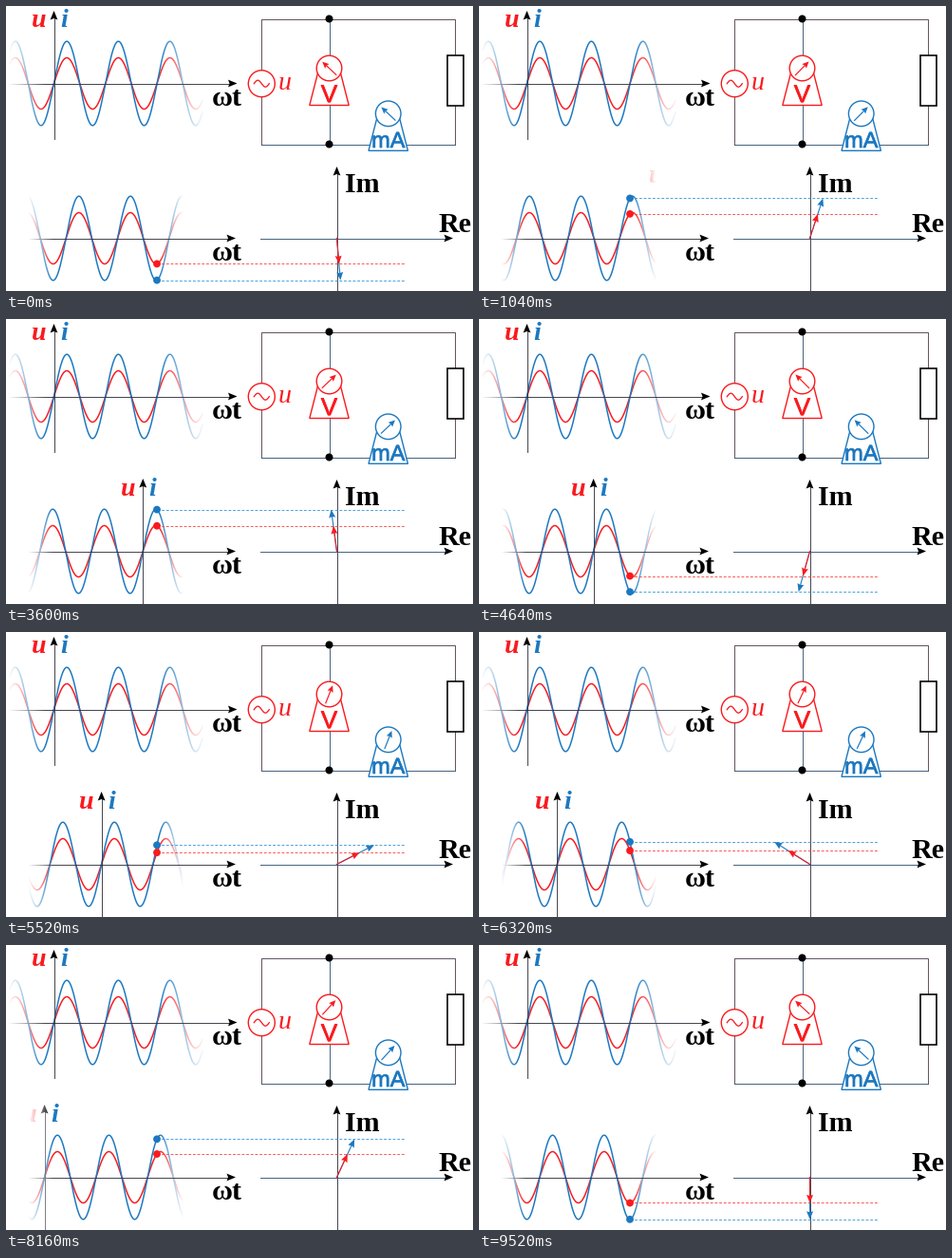
Recreate the animation shown at these times as a matplotlib script. Size 492 by 300 pixels, loop 9.6 s.

```python
import numpy as np
import matplotlib.pyplot as plt
from matplotlib.animation import FuncAnimation
from matplotlib.patches import Circle, Polygon, Rectangle
from matplotlib.patheffects import withStroke

W, H, DPI = 492, 300, 100
PX = 72 / DPI
RED, BLUE, DARK = "#fa1a1e", "#1c78c0", "#33333d"
PALE_RED, PALE_BLUE = "#fb4a4a", "#3c9bdc"
PLUM, STEEL = "#54414e", "#335272"

FRAMES, INTERVAL = 120, 80
PERIOD = 54.3              # wavelength in px
AMP_U, AMP_I = 27, 44.3
START, STEP = -445, 12.06  # phase in degrees
SAMPLE_X = 159
LEFT_X = 50.5              # vertical axis of the upper plot
MID_TOP, MID_LOW = 81.5, 244.5
ORIGIN = np.array([348.5, MID_LOW])

fig = plt.figure(figsize=(W / DPI, H / DPI), dpi=DPI, facecolor="white")
ax = fig.add_axes([0, 0, 1, 1])
ax.axis("off")


def line(x, y, color=DARK, width=0.9, z=2, **kw):
    return ax.plot(x, y, color=color, lw=width * PX, zorder=z, **kw)[0]


def label(x, y, text, color="black", size=30, family="Liberation Serif",
          weight="bold", style="normal", ha="left", z=5):
    return ax.text(x, y, text, color=color, fontsize=size * PX, family=family,
                   weight=weight, style=style, ha=ha, va="baseline", zorder=z)


def name(x, y, text, color, weight="bold", z=5):
    return label(x, y, text, color, 28, weight=weight, style="italic", z=z)


def head_points(tip, angle, length=9.5, half=3.9, notch=1.5):
    """Arrowhead outline; the angle is counted upwards from the right."""
    a = np.radians(angle)
    along = np.array([np.cos(a), -np.sin(a)])
    side = np.array([np.sin(a), np.cos(a)])
    tip = np.asarray(tip, float)
    back = tip - length * along
    return np.array([tip, back + half * side, back + notch * along,
                     back - half * side])


def head(tip, angle, color="black", z=3, **kw):
    shape = Polygon(head_points(tip, angle, **kw), fc=color, ec="none", zorder=z)
    ax.add_patch(shape)
    return shape


def disc(x, y, r, face, edge="none", width=0.0, z=3):
    shape = Circle((x, y), r, fc=face, ec=edge, lw=width * PX, zorder=z)
    ax.add_patch(shape)
    return shape


def wave(x, origin, amp, mid):
    return mid - amp * np.sin(2 * np.pi * (x - origin) / PERIOD)


def fade(x0, x1, stops, opacity, top, bottom, z):
    """White veil from x0 to x1 whose opacity is interpolated over stops."""
    x = np.arange(x0, x1, 0.5) + 0.25
    veil = np.ones((1, len(x), 4))
    veil[0, :, 3] = np.interp(x, stops, opacity)
    ax.imshow(veil, extent=(x0, x1, bottom, top), aspect="auto",
              interpolation="nearest", zorder=z)


def time_axis(start, tip, y):
    line([start, tip - 7], [y, y], z=4.2)
    head((tip, y), 0, z=4.2)


class Arrow:
    def __init__(self, color, width, z, **shape):
        self.shape = shape
        self.stem = line([], [], color, width, z)
        self.head = head((0, 0), 0, color, z + 0.1, **shape)

    def put(self, tail, tip, angle):
        points = head_points(tip, angle, **self.shape)
        end = points[2]
        self.stem.set_data([tail[0], end[0]], [tail[1], end[1]])
        self.head.set_xy(points)


class Meter:
    def __init__(self, x, y, text, color, size):
        self.center = np.array([x, y])
        ax.add_patch(Polygon([(x - 12, y + 5), (x - 20.7, y + 39),
                              (x + 20.7, y + 39), (x + 12, y + 5)],
                             fc="white", ec=color, lw=1.4 * PX, zorder=5))
        disc(x, y, 13.3, "white", color, 1.4, z=6)
        sign = label(x, y + 35.7, text, color, size, "Liberation Sans",
                     "normal", ha="center", z=7)
        sign.set_path_effects([withStroke(linewidth=0.5, foreground=color)])
        self.needle = Arrow(color, 1.2, 7, length=7, half=3.2, notch=1)

    def put(self, value):
        angle = 90 - 47 * value
        a = np.radians(angle)
        reach = 10 * np.array([np.cos(a), -np.sin(a)])
        self.needle.put(self.center - reach, self.center + reach, angle)


# Upper plot
xs_top = np.linspace(4, 207, 600)
line(xs_top, wave(xs_top, LEFT_X, AMP_U, MID_TOP), RED, 1.5)
line(xs_top, wave(xs_top, LEFT_X, AMP_I, MID_TOP), BLUE, 1.5)
fade(100, 215, [160, 210], [0, 1], 30, 135, 4)
fade(0, 60, [3, 42], [1, 0], 30, 135, 4.5)
line([LEFT_X, LEFT_X], [12, 140], z=5)
head((LEFT_X, 5), 90, z=5)
time_axis(3, 243.5, MID_TOP)
name(27, 21.8, "u", RED)
name(57, 21.8, "i", BLUE)
label(216.5, 105, "ωt")

# Circuit
line([269.4, 269.4, 472.6, 472.6], [145.5, 13.5, 13.5, 145.5], PLUM)
line([269.4, 472.6], [145.5, 145.5], STEEL)
line([340.5, 340.5], [13.5, 145.5], STEEL)
disc(340.5, 13.5, 4, "black")
disc(340.5, 145.5, 4, "black")
ax.add_patch(Rectangle((464.5, 52), 17, 53, fc="white", ec="black",
                       lw=1.6 * PX, zorder=3))
disc(269.3, 81.7, 14, "white", RED, 1.4)
xs = np.linspace(-8, 8, 40)
line(269.3 + xs, 81.7 - 3.5 * np.sin(np.pi * (xs + 8) / 8), RED, 1.3, 4)
name(287, 88, "u", RED, weight="normal")
volts = Meter(340.5, 65.5, "V", RED, 26)
amps = Meter(402.7, 113.3, "mA", BLUE, 23.5)

# Lower plot
xs_low = np.linspace(24, 187, 500)
wave_u = line(xs_low, 0 * xs_low, RED, 1.5)
wave_i = line(xs_low, 0 * xs_low, BLUE, 1.5)
axis = line([0, 0], [174, 300], z=3)
axis_head = head((0, 0), 90)
name_u = name(0, 186.2, "u", RED, z=3)
name_i = name(0, 186.2, "i", BLUE, z=3)
fade(100, 262, [161, 187], [0, 1], 160, 300, 4)
fade(0, 60, [24, 50], [1, 0], 160, 300, 4.5)
time_axis(24, 242, MID_LOW)
label(216.5, 268.5, "ωt")
dot_u = disc(SAMPLE_X, 0, 3.9, RED, z=7)
dot_i = disc(SAMPLE_X, 0, 3.9, BLUE, z=7)

# Phasor plane
line([ORIGIN[0]] * 2, [176, 300])
head((ORIGIN[0], 169), 90)
line([268, 464], [MID_LOW] * 2, STEEL)
head((471, MID_LOW), 0)
label(357, 195.5, "Im")
label(455.3, 238, "Re")
dash = dict(dashes=(3.2, 2), dash_capstyle="butt")
level_u = line([SAMPLE_X, 420], [0, 0], PALE_RED, 0.9, 4.8, **dash)
level_i = line([SAMPLE_X, 420], [0, 0], PALE_BLUE, 0.9, 4.8, **dash)
phasor_i = Arrow(BLUE, 1.1, 7, length=8.5, half=3.5, notch=1)
phasor_u = Arrow(RED, 1.1, 8, length=8.5, half=3.5, notch=1)

ax.set_xlim(0, W)
ax.set_ylim(H, 0)


def update(n):
    angle = START + STEP * n
    a = np.radians(angle)
    x0 = SAMPLE_X - angle / 360 * PERIOD

    wave_u.set_ydata(wave(xs_low, x0, AMP_U, MID_LOW))
    wave_i.set_ydata(wave(xs_low, x0, AMP_I, MID_LOW))
    axis.set_xdata([x0, x0])
    axis_head.set_xy(head_points((x0, 168), 90))
    name_u.set_x(x0 - 23.5)
    name_i.set_x(x0 + 6.5)

    for amp, dot, level, phasor in ((AMP_U, dot_u, level_u, phasor_u),
                                    (AMP_I, dot_i, level_i, phasor_i)):
        tip = ORIGIN + amp * np.array([np.cos(a), -np.sin(a)])
        dot.center = SAMPLE_X, tip[1]
        level.set_ydata([tip[1], tip[1]])
        phasor.put(ORIGIN, tip, angle)

    volts.put(np.sin(a))
    amps.put(np.sin(a))
    return []


anim = FuncAnimation(fig, update, frames=FRAMES, interval=INTERVAL,
                     repeat=True, repeat_delay=0, blit=False)
plt.show()
```
